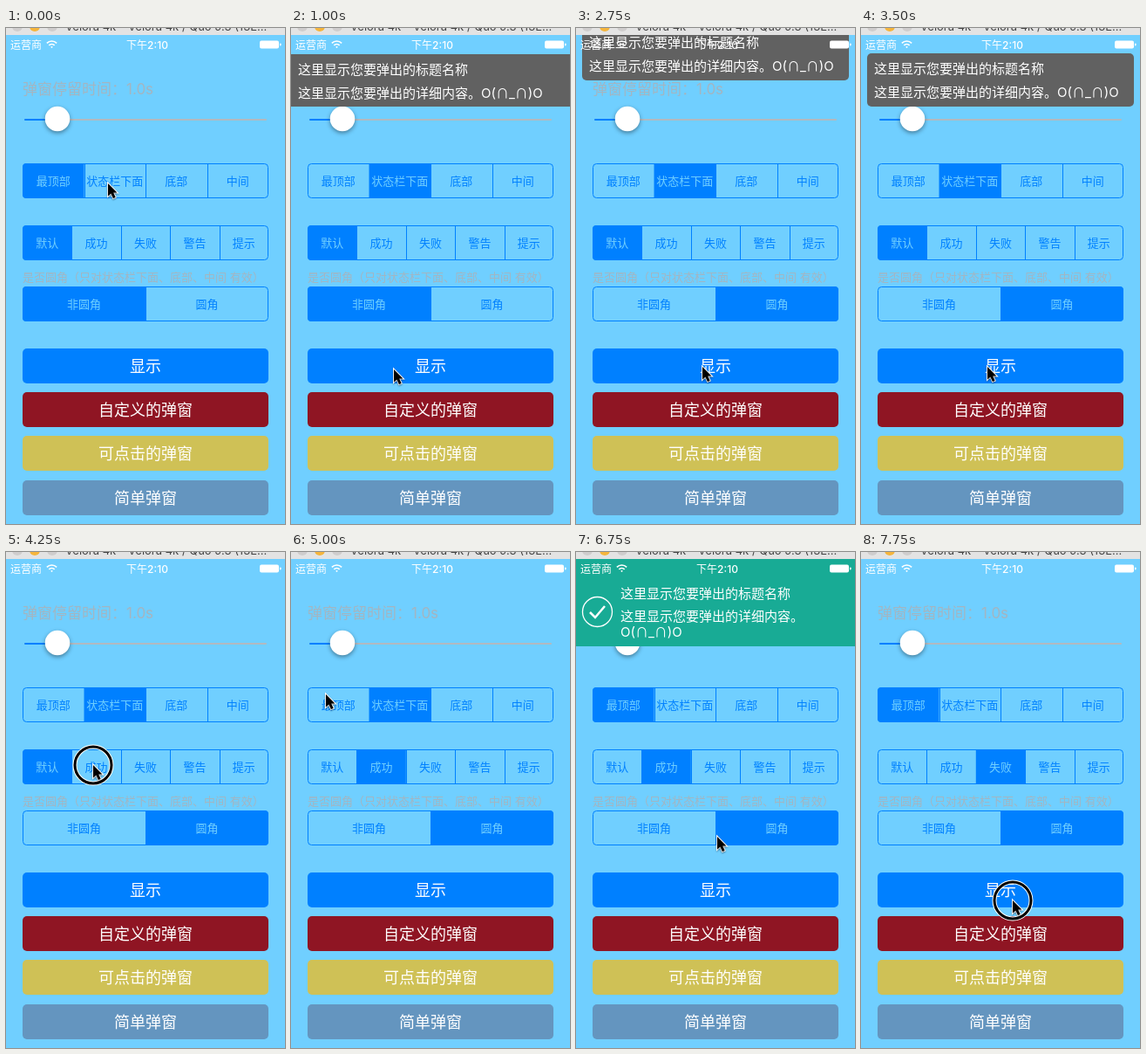
These frames come from a looping animation (320x568 px, 8 s). An HTML page with a canvas:

```html
<!DOCTYPE html>
<html lang="zh-CN">
<head>
<meta charset="utf-8">
<style>
html, body { margin: 0; width: 100%; height: 100%; overflow: hidden; background: #70cfff; }
canvas { display: block; }
</style>
</head>
<body>
<canvas id="stage" width="320" height="568"></canvas>
<script>
const ctx = document.getElementById('stage').getContext('2d');
const SKY = '#70cfff', BLUE = '#0080ff', WHITE = '#fff', GREY = '#a3b5c1';
const LOOP = 8000, STEP = 250;

// Pointer stops: time, x, y
const path = [
  [0, 117, 178], [500, 118, 391], [1250, 118, 391], [1750, 205, 317],
  [2000, 205, 317], [2500, 145, 388], [3500, 145, 388], [4250, 100, 244],
  [4750, 40, 163], [5000, 40, 163], [5750, 164, 390], [6250, 164, 390],
  [6750, 162, 326], [7000, 160, 246], [7250, 160, 246], [7750, 174, 399]
];
const clicks = [500, 1750, 2500, 4250, 4750, 5750, 7000, 7750];
const title = '这里显示您要弹出的标题名称';
const detail = '这里显示您要弹出的详细内容。';
const face = 'O(∩_∩)O';

function text(str, x, cy, size, color, align = 'left', weight = 400) {
  ctx.font = `${weight} ${size}px Inter, "Noto Sans CJK SC", "Noto Sans CJK", sans-serif`;
  ctx.textAlign = align;
  ctx.fillStyle = color;
  ctx.fillText(str, x, cy + size * 0.37);
}

function box(x, y, w, h, r, color) {
  ctx.beginPath();
  ctx.roundRect(x, y, w, h, r);
  ctx.fillStyle = color;
  ctx.fill();
}

function disc(x, y, r, color) {
  ctx.beginPath();
  ctx.arc(x, y, r, 0, 7);
  ctx.fillStyle = color;
  ctx.fill();
}

function ring(x, y, r, color, width) {
  ctx.beginPath();
  ctx.arc(x, y, r, 0, 7);
  ctx.strokeStyle = color;
  ctx.lineWidth = width;
  ctx.stroke();
}

function segments(y, labels, selected, pressed = -1) {
  const w = 282 / labels.length;
  ctx.save();
  ctx.beginPath();
  ctx.roundRect(19, y, 282, 40, 4);
  ctx.clip();
  labels.forEach((label, i) => {
    const x = 19 + i * w;
    if (i === selected) box(x, y, w, 40, 0, BLUE);
    if (i === pressed) box(x, y, w, 40, 0, '#0080ff50');
    if (i) box(Math.round(x), y, 1, 40, 0, BLUE);
    text(label, x + w / 2, y + 20, 13, i === selected ? SKY : BLUE, 'center');
  });
  ctx.restore();
  ctx.beginPath();
  ctx.roundRect(19.5, y + 0.5, 281, 39, 4);
  ctx.strokeStyle = BLUE;
  ctx.lineWidth = 1;
  ctx.stroke();
}

function button(y, label, color) {
  box(19, y, 282, 40, 5, color);
  text(label, 160, y + 20.5, 18, WHITE, 'center');
}

function slider() {
  box(21, 104, 278, 2, 1, '#b1b9c0');
  box(21, 104, 38, 2, 1, BLUE);
  ctx.save();
  ctx.shadowColor = '#0006';
  ctx.shadowBlur = 5;
  ctx.shadowOffsetY = 2;
  disc(59, 104, 14.3, WHITE);
  ctx.restore();
}

// Slides in during one step, holds, then vanishes
function popup(t, start, height, draw) {
  if (t < start || t >= start + 1000) return;
  ctx.save();
  if (t < start + STEP) ctx.translate(0, -height / 2);
  draw();
  ctx.restore();
}

function message(x, dy) {
  text(title, x, 47 + dy, 15, WHITE, 'left', 500);
  text(detail + face, x, 74 + dy, 15, WHITE);
}

function success() {
  box(0, 8, 320, 100, 0, '#18ab95');
  ring(24.5, 68.5, 17, WHITE, 1.3);
  ctx.beginPath();
  ctx.moveTo(16, 69);
  ctx.lineTo(22, 75);
  ctx.lineTo(33, 62);
  ctx.lineWidth = 2.5;
  ctx.stroke();
  text(title, 51, 47, 15, WHITE, 'left', 500);
  text(detail, 51, 73, 15, WHITE);
  text(face, 51, 91, 15, WHITE);
}

function statusBar() {
  text('运营商', 5, 19.5, 12, WHITE);
  text('下午2:10', 162, 19.5, 12, WHITE, 'center', 500);
  ctx.strokeStyle = WHITE;
  ctx.lineWidth = 1.7;
  for (const r of [1, 4.5, 8]) {
    ctx.beginPath();
    ctx.arc(52.5, 23, r, -Math.PI * 0.75, -Math.PI * 0.25);
    ctx.stroke();
  }
  box(291, 14.5, 22, 9, 2, WHITE);
  box(314, 17.5, 1.5, 3, 1, WHITE);
}

function titleBar() {
  box(0, 0, 320, 8, 0, '#e3e3e3');
  disc(13, -2, 6, '#cfcdcd');
  disc(33, -2, 6, '#f5b53c');
  disc(53, -2, 6, '#cfcdcd');
  text('Velora 4k – Velora 4k / Quo 9.3 (13E...', 68, -1.5, 13, '#444');
}

function pointer(t) {
  const i = path.findLastIndex(stop => stop[0] <= t);
  const [t0, x0, y0] = path[i];
  const [t1, x1, y1] = path[i + 1] || [LOOP, x0, y0];
  const k = (t - t0) / (t1 - t0);
  const x = x0 + (x1 - x0) * k, y = y0 + (y1 - y0) * k;
  if (clicks.includes(t)) {
    ring(x, y, 21, WHITE, 5);
    ring(x, y, 21, '#000', 3);
  }
  ctx.save();
  ctx.translate(x, y);
  ctx.shadowColor = '#0005';
  ctx.shadowBlur = 2;
  ctx.shadowOffsetY = 1;
  const arrow = new Path2D('M0 0V14.5L3.4 11.4L6 17L8.6 15.8L6.1 10.4H10.4Z');
  ctx.strokeStyle = WHITE;
  ctx.lineWidth = 2;
  ctx.stroke(arrow);
  ctx.fillStyle = '#000';
  ctx.fill(arrow);
  ctx.restore();
}

function draw(t) {
  box(0, 0, 320, 568, 0, SKY);
  text('弹窗停留时间：1.0s', 19, 70, 17, GREY);
  slider();
  segments(155, ['最顶部', '状态栏下面', '底部', '中间'], t >= 250 && t < 5250 ? 1 : 0);
  segments(226, ['默认', '成功', '失败', '警告', '提示'], t < 4500 ? 0 : t < 7250 ? 1 : 2);
  text('是否圆角（只对状态栏下面、底部、中间 有效）', 19, 285.5, 13, GREY);
  segments(296, ['非圆角', '圆角'], t < 2250 ? 0 : 1, t === 2000 ? 1 : -1);
  button(367, '显示', BLUE);
  button(417, '自定义的弹窗', '#8f1523');
  button(467, '可点击的弹窗', '#cfc156');
  button(518, '简单弹窗', '#6495bf');

  popup(t, 750, 60, () => {
    box(0, 30, 320, 60, 0, '#616161');
    message(8, 0);
  });
  popup(t, 2750, 60, () => {
    box(7, 29, 306, 61, 5, '#616161');
    message(15, -0.5);
  });
  popup(t, 6000, 100, success);
  statusBar();
  titleBar();
  pointer(t);
}

function tick() {
  const t = performance.now() % LOOP;
  draw(Math.floor(t / STEP) * STEP);
  requestAnimationFrame(tick);
}
tick();
</script>
</body>
</html>
```
